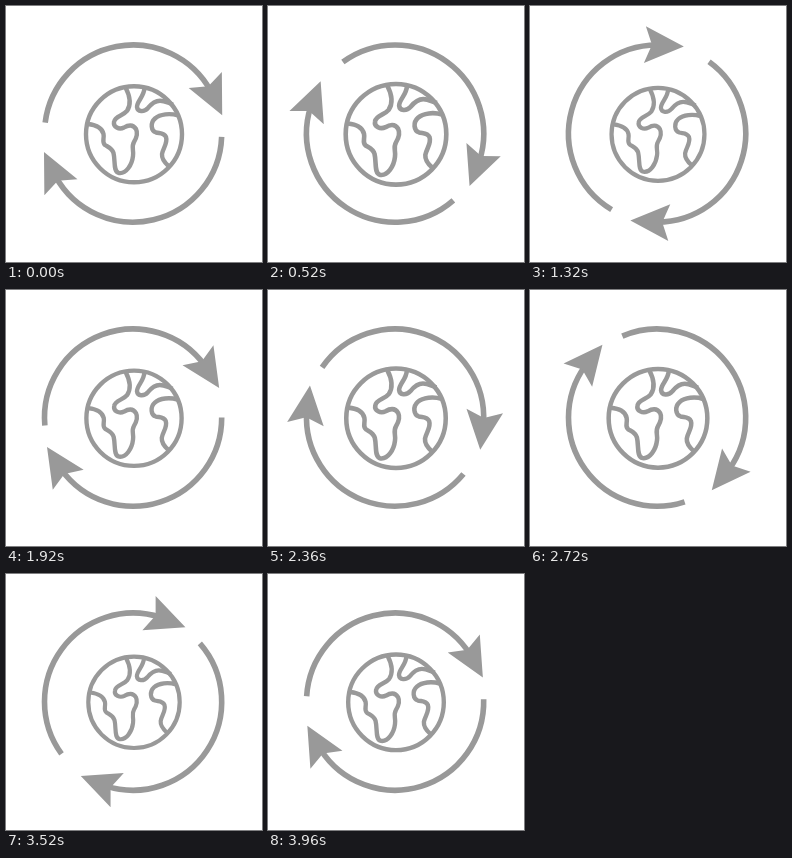
An HTML page for the animation above (4 s loop, 256x256 px).

```html
<!DOCTYPE html>
<html lang="en">
<head>
<meta charset="utf-8">
<title>Turning globe</title>
<style>
  html, body { margin: 0; width: 100%; height: 100%; overflow: hidden; background: #fff; }
  svg { display: block; width: 100%; height: 100%; }
</style>
</head>
<body>
<svg viewBox="0 0 256 256">
  <g id="ring" fill="none" stroke="#999" stroke-width="5.6"></g>
  <g id="globe" fill="none" stroke="#999" stroke-width="4.4" stroke-linejoin="round">
    <circle cx="128" cy="128.3" r="48"/>
    <path d="M82 118C90 119 96 121 97.500 128C98.500 133 95.500 136 99 139C102 141 106 142 107.500 147C109.500 155 107 166 113 167C120 168 126 159 127 150C128 144 125 141 128 136C131 131 132 127 130 123C127 118 122 119 118 121.500C113 124 107 121 108 116C109 110 117 110 121 105C125 99 124 90 119.500 81.500"/>
    <path d="M138.500 82C138 91 131 95 131 101C131.500 106 138 106.500 142 102C146 97 149 94.700 154 94.700C159 94.700 162 97 167 98.500"/>
    <path d="M172 109.500C164 107 154 108 149 112.500C144 117 145 125 150 126.500C154 127.500 158 126.500 160 131C162 137 157 142 156 148C155.500 153 159 157 163 160.500"/>
  </g>
</svg>
<script>
const LOOP = 4000, CX = 127.1, CY = 127.6, R = 88.6;
const ring = document.getElementById('ring');
const globe = document.getElementById('globe');

const polar = deg => {
  const a = deg * Math.PI / 180;
  return `${R * Math.cos(a)} ${R * Math.sin(a)}`;
};

// Triangle wave: 0, 1, 0, -1 at each quarter
const triangle = p => 1 - 4 * Math.abs((p + 0.25) % 1 - 0.5);

function addArrow(tail, tip) {
  ring.insertAdjacentHTML('beforeend', `
    <path d="M${polar(tail)}A${R} ${R} 0 0 1 ${polar(tip - 17)}"/>
    <path d="M91 0L99.4 -42.3L83.3 -31L63.7 -33.4Z" fill="#999" stroke="none"
      transform="rotate(${tip})"/>`);
}

addArrow(187, 348.2);
addArrow(2, 168.2);

function draw(ms) {
  const p = (ms % LOOP) / LOOP;
  const s = 1 + 0.05 * triangle(p * 2);
  ring.setAttribute('transform', `translate(${CX} ${CY}) rotate(${p * 360})`);
  globe.setAttribute('transform', `translate(128 128.3) scale(${s}) translate(-128 -128.3)`);
}

const start = performance.now();
function tick() {
  draw(performance.now() - start);
  requestAnimationFrame(tick);
}
tick();
</script>
</body>
</html>
```
